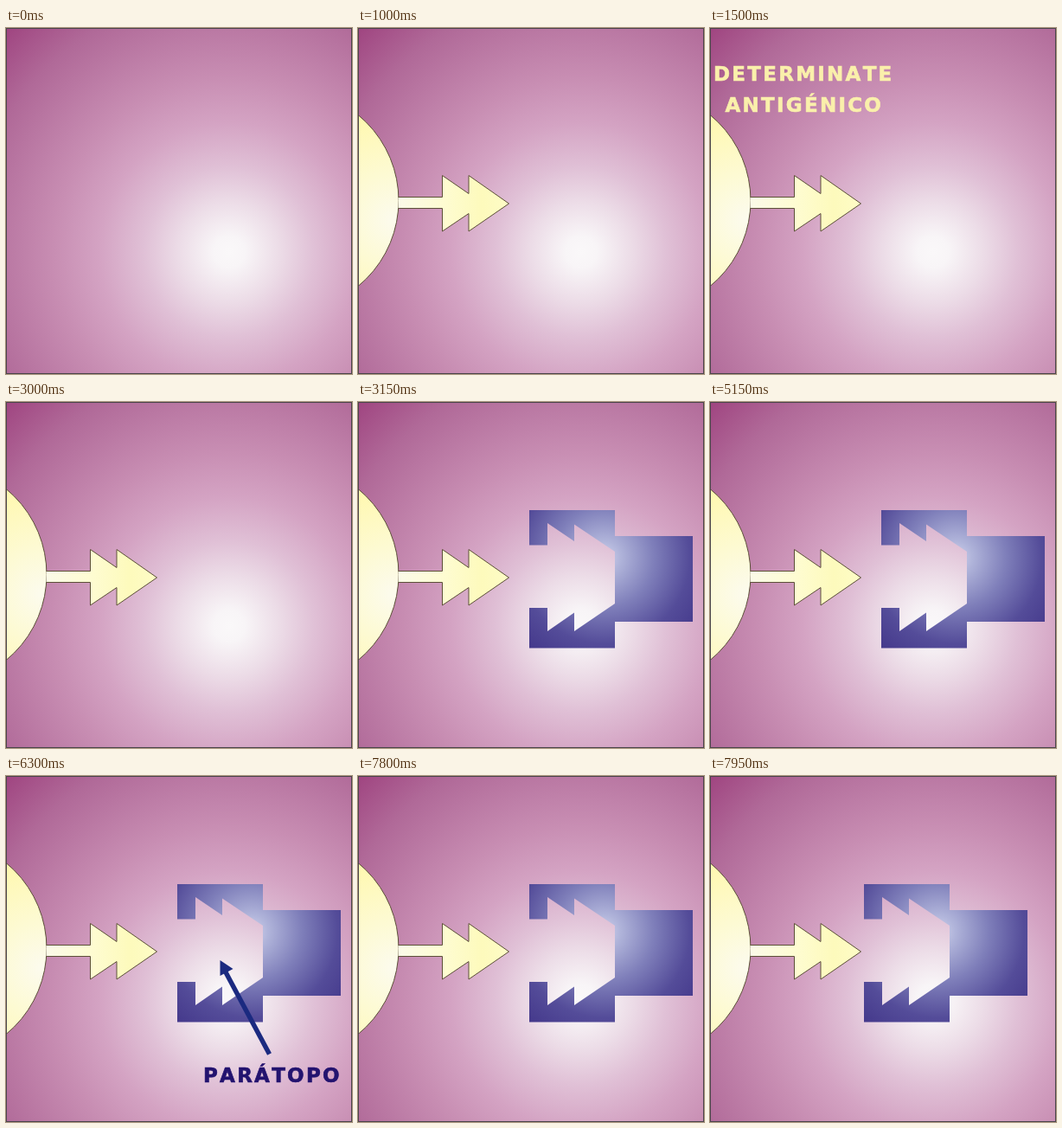
These frames come from a looping animation (400x400 px, 8 s). An HTML page:

```html
<!DOCTYPE html>
<html lang="es">
<head>
<meta charset="utf-8">
<title>Antígeno y anticuerpo</title>
<style>
  html, body { margin: 0; width: 100%; height: 100%; overflow: hidden; }
  svg { display: block; width: 100vw; height: 100vh; }
  text {
    font: 700 23px "DejaVu Sans", sans-serif;
    font-kerning: none;
    letter-spacing: 2.25px;
    stroke-width: .6px;
  }
  .cream { fill: #faf0ab; stroke: #faf0ab; }
  .navy { fill: #23136f; stroke: #23136f; }
  .step { visibility: hidden; animation: 8s step-end infinite; }
  .antigen { animation-name: antigen; }
  .antigen-label { animation-name: antigen-label; }
  .antibody { animation-name: antibody; }
  .antibody-label { animation-name: antibody-label; }
  .paratope { animation-name: paratope; }
  .pointer { animation-name: pointer; }

  @keyframes antigen { 0% { visibility: hidden } 12.5%, 100% { visibility: visible } }
  @keyframes antigen-label {
    0% { visibility: hidden } 18.75% { visibility: visible } 37.5%, 100% { visibility: hidden }
  }
  @keyframes antibody {
    0% { visibility: hidden; transform: none }
    39.375% { visibility: visible; transform: none }
    99.375%, 100% { visibility: visible; transform: translateX(-20px) }
  }
  @keyframes antibody-label {
    0% { visibility: hidden } 45.625% { visibility: visible } 64.375%, 100% { visibility: hidden }
  }
  @keyframes paratope {
    0% { visibility: hidden } 66.25% { visibility: visible } 97.5%, 100% { visibility: hidden }
  }
  @keyframes pointer {
    0% { visibility: hidden } 78.75% { visibility: visible } 97.5%, 100% { visibility: hidden }
  }
</style>
</head>
<body>
<svg viewBox="0 0 400 400">
  <defs>
    <radialGradient id="glow" gradientUnits="userSpaceOnUse" cx="258" cy="259" r="366">
      <stop offset="0" stop-color="#faf8f9"/>
      <stop offset=".05" stop-color="#f8f5f7"/>
      <stop offset=".16" stop-color="#ecdce7"/>
      <stop offset=".27" stop-color="#e0c0d6"/>
      <stop offset=".41" stop-color="#d4a3c3"/>
      <stop offset=".55" stop-color="#c88eb3"/>
      <stop offset=".82" stop-color="#b06998"/>
      <stop offset="1" stop-color="#9f4480"/>
    </radialGradient>
    <radialGradient id="cell" gradientUnits="userSpaceOnUse" cx="42" cy="222" r="125">
      <stop offset="0" stop-color="#fcfbee"/>
      <stop offset=".45" stop-color="#fdfad2"/>
      <stop offset="1" stop-color="#fff8b0"/>
    </radialGradient>
    <linearGradient id="spike" gradientUnits="userSpaceOnUse" x1="46" y1="0" x2="175" y2="0">
      <stop offset="0" stop-color="#fbfae8"/>
      <stop offset=".4" stop-color="#fefcd2"/>
      <stop offset=".75" stop-color="#fdfabc"/>
      <stop offset="1" stop-color="#fefcc6"/>
    </linearGradient>
    <radialGradient id="violet" gradientUnits="userSpaceOnUse" cx="284" cy="180" r="138">
      <stop offset="0" stop-color="#cfd2ec"/>
      <stop offset=".14" stop-color="#b0b4da"/>
      <stop offset=".42" stop-color="#7f7fba"/>
      <stop offset=".72" stop-color="#544c99"/>
      <stop offset="1" stop-color="#43378a"/>
    </radialGradient>
  </defs>

  <rect width="400" height="400" fill="url(#glow)"/>

  <g class="step antigen" stroke="#5c5038">
    <circle cx="-81" cy="199.5" r="128" fill="url(#cell)"/>
    <path d="M46.5 195.5H97.5V170.5L128 191.5V170.5L174.5 203L128 235V214.5L97.5 235V208.5H46.5" fill="url(#spike)"/>
  </g>

  <path class="step antibody" fill="url(#violet)"
    d="M198 125H297V155H387V254H297V284.5H198V238H219V265L250 243.500V265L297 233V173L250 141.500V161L219 140V165.500H198Z"/>

  <g class="step antigen-label cream">
    <text x="4" y="60.5">DETERMINATE</text>
    <text x="17.5" y="96.500">ANTIGÉNICO</text>
  </g>
  <g class="step antibody-label navy">
    <text x="196" y="60.5">ANTICUERPO</text>
    <text x="203" y="96.500">ESPECÍFICO</text>
  </g>
  <text class="step paratope navy" x="228" y="353.500">PARÁTOPO</text>
  <g class="step pointer" fill="#1b2a80">
    <path d="M253 225L304.500 321.500" stroke="#1b2a80" stroke-width="5.5"/>
    <path d="M247.500 213L262.500 223L247.500 231Z"/>
  </g>

  <rect x=".5" y=".5" width="399" height="399" fill="none" stroke="#4a444a"/>
</svg>
</body>
</html>
```
